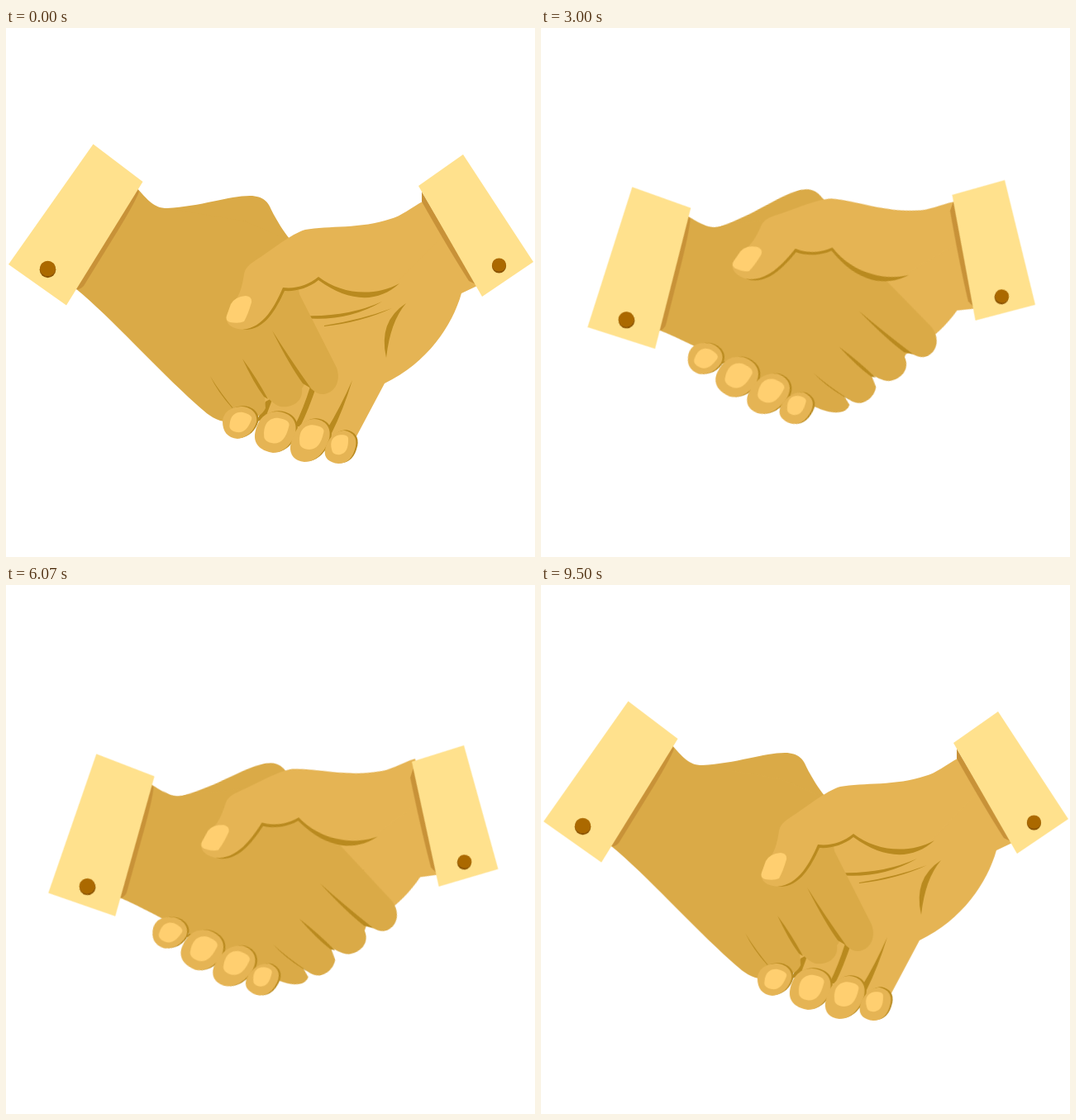
Write an HTML page that moves like this. It is 640 by 640 pixels and loops after 9.57 s.

```html
<!DOCTYPE html>
<html lang="en">
<head>
<meta charset="utf-8">
<title>Handshake</title>
<style>
  html, body { margin: 0; height: 100%; overflow: hidden; background: #fff; }
  svg { display: block; width: 100%; height: 100%; }

  .cuff { fill: #ffe18d; }
  .hem { fill: #c89238; }
  .left-skin { fill: #daaa47; }
  .skin { fill: #e5b454; }
  .fold { fill: #b98a1f; }
  .nail { fill: #ffcf70; }
  .rays { stroke: #ffe18d; stroke-width: 8; stroke-linecap: round; }

  .left, .knuckle, .right, .thumb, .tips, .rays {
    animation: 4785ms infinite cubic-bezier(.37, 0, .63, 1);
  }
  .left { transform-origin: 105px 141px; animation-name: left; }
  .knuckle { transform-origin: 195px 218px; animation-name: knuckle; }
  .right { transform-origin: 553px 153px; animation-name: right; }
  .thumb { transform-origin: 357px 227px; animation-name: thumb; }
  .tips { transform-origin: 283px 477px; animation-name: tips; }
  .rays { transform-origin: 324.5px 322px; animation-name: rays; }

  @keyframes left {
    0% { transform: translate(0, 0) rotate(0deg); }
    1.57% { transform: translate(0, -.7px) rotate(0deg); }
    17.8% { transform: translate(3px, 62px) rotate(-16.3deg); }
    26.9% { transform: translate(4px, 64px) rotate(-16.1deg); animation-timing-function: ease-in; }
    31.35% { transform: translate(1px, 59px) rotate(-16.8deg); animation-timing-function: cubic-bezier(.35, .45, .6, 1); }
    44.3% { transform: translate(4px, 44px) rotate(-19deg); }
    53.9% { transform: translate(3px, 65px) rotate(-16deg); animation-timing-function: ease-in; }
    62.7% { transform: translate(5px, 52px) rotate(-17.5deg); animation-timing-function: ease-out; }
    68.65% { transform: translate(8px, 53px) rotate(-18.5deg); }
    79% { transform: translate(1px, 66px) rotate(-15.8deg); }
    99.1%, 100% { transform: translate(0, 0) rotate(0deg); }
  }
  @keyframes knuckle {
    0%, 6.27%, 99.1%, 100% { transform: rotate(0deg); }
    17.8%, 31.35%, 53.9%, 79% { transform: rotate(2.8deg); }
    44.3%, 62.7%, 68.65% { transform: rotate(1.1deg); }
  }
  @keyframes right {
    0% { transform: translate(0, 0) rotate(0deg); animation-timing-function: ease-in; }
    1.57% { transform: translate(8px, -1.3px) rotate(0deg); animation-timing-function: ease-out; }
    6.27% { transform: translate(45px, -18px) rotate(0deg); }
    17.8% { transform: translate(2px, 39px) rotate(17.7deg); }
    26.9% { transform: translate(1px, 41px) rotate(17.7deg); animation-timing-function: ease-in; }
    31.35% { transform: translate(4px, 36px) rotate(18.4deg); animation-timing-function: cubic-bezier(.35, .45, .6, 1); }
    44.3% { transform: translate(14px, 18px) rotate(21.7deg); }
    53.9% { transform: translate(1px, 43px) rotate(17.6deg); animation-timing-function: ease-in; }
    62.7% { transform: translate(8px, 31px) rotate(19.4deg); animation-timing-function: ease-out; }
    68.65% { transform: translate(11px, 28px) rotate(20.6deg); }
    79% { transform: translate(1px, 44px) rotate(17.5deg); }
    99.1%, 100% { transform: translate(0, 0) rotate(0deg); }
  }
  @keyframes thumb {
    0%, 6.27%, 99.1%, 100% { transform: rotate(0deg); }
    17.8%, 26.9% { transform: rotate(-8.8deg); }
    31.35%, 53.9%, 79% { transform: rotate(-8deg); }
    44.3%, 68.65% { transform: rotate(-5.5deg); }
    62.7% { transform: rotate(-4.3deg); }
  }
  @keyframes tips {
    0%, 6.27%, 99.1%, 100% { transform: rotate(0deg); }
    17.8%, 79% { transform: rotate(-4.8deg); }
  }
  @keyframes rays {
    0%, 13% { transform: scale(.5); opacity: 0; }
    14% { opacity: 1; }
    18.5% { transform: scale(1); opacity: 1; }
    22.4% { transform: scale(.955); opacity: .6; }
    25%, 100% { transform: scale(.9); opacity: 0; }
  }
</style>
</head>
<body>
<svg viewBox="0 0 640 640">
  <defs>
    <g id="button">
      <ellipse cy=".8" rx="9.8" ry="10" fill="#8a5300"/>
      <ellipse cy="-.6" rx="9.6" ry="9.2" fill="#ab6900"/>
    </g>
    <path id="ray" d="M324.5 87V34"/>
    <path id="nail" d="M-13 3C-12-9-5-13 3-12C11-10 16-7 13-2C9 8 4 13-4 12C-10 11-14 8-13 3Z"/>
    <path id="tip1" d="M262 476C263 462 276 458 286 458C298 459 305 468 303 477C300 487 292 496 280 497C268 496 262 488 262 476Z"/>
    <path id="tip2" d="M301 492C303 476 312 464 328 464C344 465 353 475 350 490C346 503 336 514 323 514C310 512 300 505 301 492Z"/>
    <path id="tip3" d="M344 506C347 488 358 473 373 473C387 474 394 484 391 497C386 512 376 525 361 525C349 524 343 516 344 506Z"/>
    <path id="tip4" d="M386 510C389 497 398 487 410 487C420 489 425 496 423 506C420 520 413 527 402 527C391 526 384 520 386 510Z"/>
  </defs>

  <g class="rays" id="rays"></g>

  <!-- right palm, behind the left hand -->
  <g class="right">
    <path class="skin" d="M515 222L440 258L362 250L330 262V330L305 455L310 480L350 490L395 502L424 494L458 430C510 405 540 360 551 321L572 311Z"/>
    <g class="fold">
      <path d="M360 348Q413 350 455 331Q412 356 360 351Z"/>
      <path d="M385 360Q430 353 467 339Q430 356 385 361Z"/>
      <path d="M484 333Q450 355 460 399Q465 355 484 333Z"/>
      <path d="M419 426Q408 462 394 490L388 486Q405 458 419 426Z"/>
      <path d="M376 432Q366 462 356 482L349 482Q360 460 368 434Z"/>
      <path d="M323 447L313 474L303 476L314 452Z"/>
    </g>
  </g>

  <g class="left">
    <path class="left-skin knuckle" d="M170 207C179 217 184 218 195 218C235 216 270 203 295 203C312 203 318 212 321 220C328 234 336 246 343 255L300 285L195 250Z"/>
    <path class="left-skin" d="M158 193C175 213 182 218 195 218L290 234L343 257L355 322L400 411C405 425 400 440 385 443C374 444 369 435 362 430L358 436C360 452 346 460 332 458C322 455 318 447 313 445L314 460C310 468 301 474 291 473C282 471 278 464 274 459L277 471C272 477 266 477 259 475C247 471 238 462 230 455C180 410 130 353 84 315Z"/>
    <g class="fold">
      <path d="M322 366Q342 398 369 436L359 430Q343 408 322 366Z"/>
      <path d="M286 400Q303 423 317 449L312 446Q300 430 286 400Z"/>
      <path d="M247 421Q258 440 279 465L273 459Q256 440 247 421Z"/>
    </g>
    <path class="hem" d="M156 190L161 198Q156 212 128 257L94 312Q90 317 84 316Z"/>
    <path class="cuff" d="M105.500 140.500L165.500 186L73 335.500L3 286Z"/>
    <use href="#button" x="50.500" y="291.500"/>
  </g>

  <!-- right thumb, cuff and finger tips, in front -->
  <g class="right">
    <g class="thumb">
      <path class="skin" d="M362 244C345 249 322 268 302 281C294 286 289 291 288 298C286 310 284 320 278 329C271 339 266 346 267 354C270 364 285 366 293 364C312 358 324 340 336 316C350 317 366 312 378 302C400 321 440 328 470 311L528 252L506 209C490 217 478 228 465 231C430 243 390 239 362 244Z"/>
      <path class="fold" d="M286 365C312 363 326 335 335 314C350 316 366 311 378 301C405 322 445 326 476 309C450 333 415 332 378 305C366 315 350 319 337 318C326 342 312 367 286 365Z"/>
      <path class="nail" d="M272 334Q277 325 290 324Q298 325 297 332Q293 346 288 355Q282 358 271 356Q265 354 267 348Z"/>
    </g>
    <path class="hem" d="M503 198V210Q535 267 560 306L570 311Z"/>
    <path class="cuff" d="M553 153L638 283L576 325L499 191Z"/>
    <use href="#button" transform="translate(596.5 287) scale(.88)"/>
    <g class="tips">
      <g class="fold" transform="translate(2.200 -.8)">
        <use href="#tip1"/><use href="#tip2"/><use href="#tip3"/><use href="#tip4"/>
      </g>
      <g class="skin">
        <use href="#tip1"/><use href="#tip2"/><use href="#tip3"/><use href="#tip4"/>
      </g>
      <g class="nail">
        <use href="#nail" transform="translate(283.500 477)"/>
        <use href="#nail" transform="translate(327 487) rotate(-6) scale(1.180 1.250)"/>
        <use href="#nail" transform="translate(369.500 495) rotate(-8) scale(1.150 1.200)"/>
        <use href="#nail" transform="translate(404 504) rotate(-20) scale(.88 .95)"/>
      </g>
    </g>
  </g>
</svg>
<script>
  const rays = document.getElementById("rays");
  for (let a = 0; a < 360; a += 30) {
    const ray = document.createElementNS("http://www.w3.org/2000/svg", "use");
    ray.setAttribute("href", "#ray");
    ray.setAttribute("transform", `rotate(${a} 324.5 322)`);
    rays.append(ray);
  }
</script>
</body>
</html>
```
